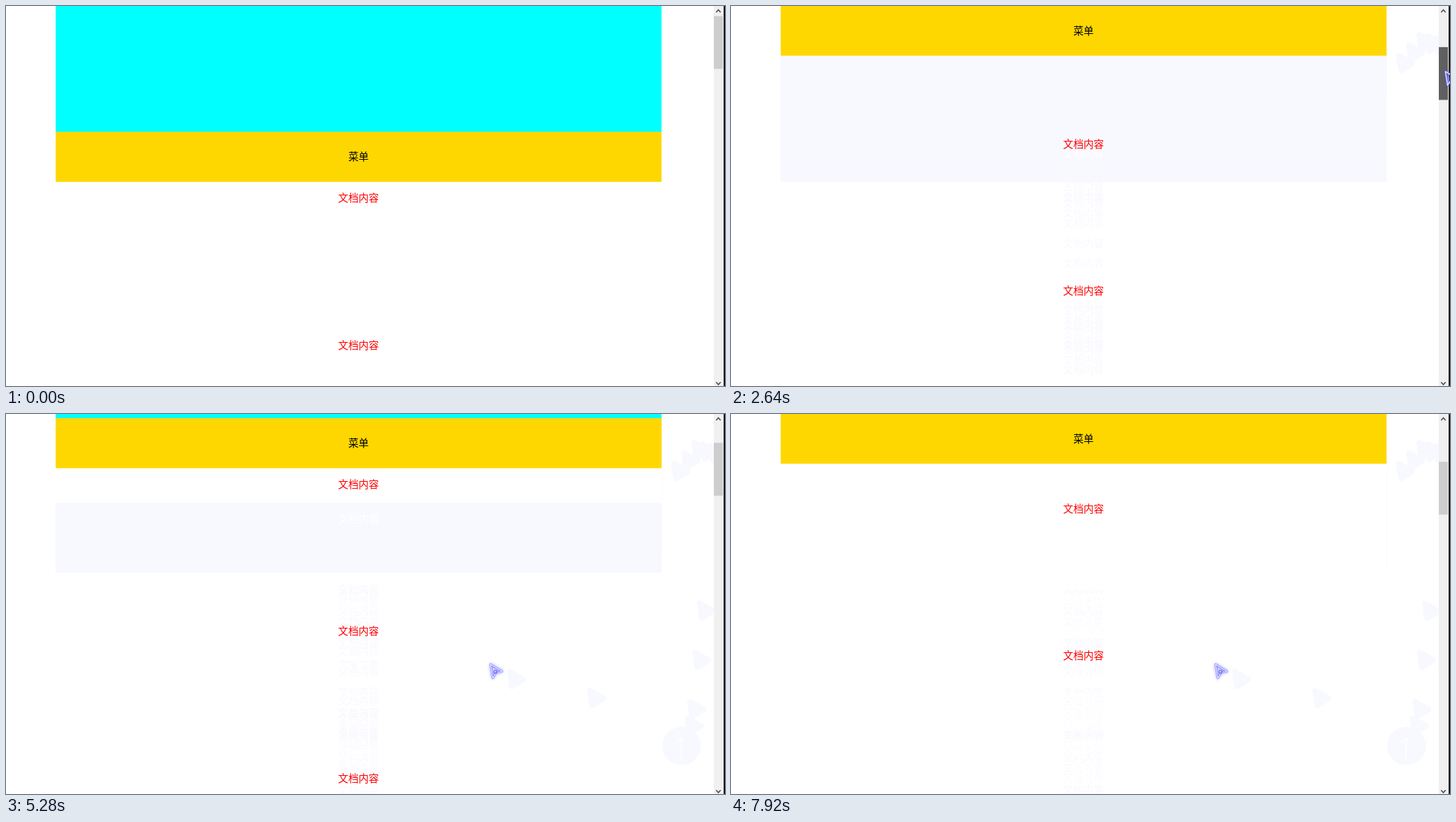
Animation, 1029 px wide and 544 px high, one loop 8000 ms. Source, as an HTML page with a canvas:

```html
<!DOCTYPE html>
<html lang="zh-CN">
<head>
<meta charset="utf-8">
<title>菜单</title>
<style>
html, body { margin: 0; width: 100%; height: 100%; overflow: hidden; background: #fff; }
canvas { display: block; }
</style>
</head>
<body>
<canvas id="stage" width="1029" height="544"></canvas>
<script>
const W = 1029, H = 544, TICK = 120, LOOP = 8000;
const LEFT = 71.1, WIDTH = 867.1, MIDDLE = 504.5;
const BANNER = 180, MENU_BOTTOM = 251.8, PINNED_BOTTOM = 71.2;
const ROW = 210.3, FIRST_ROW = 276;
const THUMB_RATIO = 0.154, BUTTON_FROM = 360;
const TRACE = '#f8f8ff';

const screen = document.getElementById('stage').getContext('2d');
const traces = Object.assign(document.createElement('canvas'), { width: W, height: H }).getContext('2d');

const linear = p => p;
const swing = p => 0.5 - 0.5 * Math.cos(Math.PI * p);
const within = (time, from, to) => time >= from && time < to;

// Keys are [time, ...values]; values are held before the first and after the last key.
function interpolate(keys, time, ease = linear) {
  const next = keys.findIndex(key => key[0] > time);
  if (next === 0) return keys[0].slice(1);
  if (next < 0) return keys[keys.length - 1].slice(1);
  const [from, to] = [keys[next - 1], keys[next]];
  const p = ease((time - from[0]) / (to[0] - from[0]));
  return from.slice(1).map((value, i) => value + (to[i + 1] - value) * p);
}

const dragDown = [[960, 0], [1680, 175], [2640, 288], [2880, 384]];
const backToTop = [[3775, 384], [4275, 0]];
const wheel = [
  [4860, 0], [5400, 224], [5880, 283], [6120, 283], [6360, 191], [6660, 0],
  [6900, 0], [7200, 81], [7680, 267], [7920, 350]
];
const pointerPath = [
  [360, 956, 71], [600, 985, 41], [960, 1021, 48], [2880, 1021, 107],
  [3000, 993, 271], [3240, 979, 412], [3480, 972, 459], [4200, 972, 459],
  [4320, 836, 396], [4440, 721, 369], [4560, 692, 357]
];

function scrollAt(time) {
  if (time < 3600) return interpolate(dragDown, time)[0];
  if (time < 4800) return interpolate(backToTop, time, swing)[0];
  return interpolate(wheel, time)[0];
}

function stateAt(time) {
  const scroll = scrollAt(time);
  const dragging = within(time, 960, 3000);
  const clean = within(time, 2640, 2880) || within(time, 4920, 5040) ||
    within(time, 5280, 6300) || time >= 6480;
  return {
    scroll, dragging,
    pointer: time < 360 ? null
      : dragging ? [1021, 48 + scroll * THUMB_RATIO]
      : interpolate(pointerPath, time),
    button: scroll > BUTTON_FROM,
    tone: clean ? '#fff' : TRACE
  };
}

function polyline(ctx, points, close) {
  ctx.beginPath();
  points.forEach(([x, y]) => ctx.lineTo(x, y));
  if (close) ctx.closePath();
}

function label(ctx, text, y, color) {
  ctx.font = '14.6px "Noto Sans CJK SC", "Noto Sans CJK", sans-serif';
  ctx.textAlign = 'center';
  ctx.fillStyle = color;
  ctx.fillText(text, MIDDLE, Math.round(y + 4.4));
}

function rows(ctx, scroll, color) {
  for (let n = 0; n < 5; n++) label(ctx, '文档内容', FIRST_ROW + n * ROW - scroll, color);
}

function header(ctx, scroll, bannerColor, menuColor) {
  const top = Math.round(Math.max(0, BANNER - scroll));
  const bottom = Math.max(PINNED_BOTTOM, MENU_BOTTOM - scroll);
  ctx.fillStyle = bannerColor;
  ctx.fillRect(LEFT, 0, WIDTH, top);
  ctx.fillStyle = menuColor;
  ctx.fillRect(LEFT, top, WIDTH, bottom - top);
  return top;
}

function topButton(ctx, color) {
  ctx.fillStyle = color;
  ctx.beginPath();
  ctx.arc(966.8, 475.3, 27.5, 0, 7);
  ctx.fill();
  ctx.strokeStyle = '#fff';
  ctx.lineWidth = 1.6;
  polyline(ctx, [[966.5, 495], [966.5, 464]]);
  ctx.stroke();
  polyline(ctx, [[960.5, 470], [966.5, 464], [972.5, 470]]);
  ctx.stroke();
}

function pointerTrace(ctx, [x, y], color) {
  polyline(ctx, [[x, y], [x + 19, y + 11], [x + 3, y + 21]], true);
  ctx.fillStyle = ctx.strokeStyle = color;
  ctx.lineJoin = 'round';
  ctx.lineWidth = 8;
  ctx.fill();
  ctx.stroke();
}

function drawPointer(ctx, [x, y]) {
  ctx.save();
  ctx.translate(x, y);
  ctx.lineJoin = 'round';
  polyline(ctx, [[1.5, 1.5], [18, 11.5], [9.5, 13.5], [4.5, 21]], true);
  ctx.shadowColor = 'rgba(80, 80, 255, 0.7)';
  ctx.shadowBlur = 4;
  ctx.strokeStyle = 'rgba(110, 110, 250, 0.75)';
  ctx.lineWidth = 2.8;
  ctx.stroke();
  ctx.shadowBlur = 0;
  ctx.strokeStyle = '#fff';
  ctx.lineWidth = 1.2;
  ctx.stroke();
  ctx.fillStyle = 'rgba(90, 90, 255, 0.15)';
  ctx.fill();
  ctx.strokeStyle = 'rgba(90, 90, 240, 0.8)';
  ctx.beginPath();
  ctx.arc(8.5, 12, 2.2, 0, 7);
  ctx.stroke();
  ctx.restore();
}

function scrollbar(ctx, { scroll, dragging }) {
  ctx.fillStyle = '#f0f0f0';
  ctx.fillRect(1013, 0, 13.5, H);
  ctx.fillStyle = dragging ? '#606060' : '#cdcdcd';
  ctx.fillRect(1013, 14.5 + scroll * THUMB_RATIO, 13, 75.6);
  ctx.fillStyle = '#1c1c1c';
  ctx.fillRect(1027, 0, 2, H);
  ctx.strokeStyle = '#505050';
  ctx.lineWidth = 1.7;
  ctx.lineJoin = 'miter';
  for (const [y, dir] of [[7, 1], [540.5, -1]]) {
    polyline(ctx, [[1016.3, y + 2 * dir], [1019.5, y - 1.5 * dir], [1022.7, y + 2 * dir]]);
    ctx.stroke();
  }
}

// Everything that moved since the previous tick is wiped with the current tone.
function wipe(prev, next) {
  const { tone } = next;
  if (prev.scroll !== next.scroll) {
    rows(traces, prev.scroll, tone);
    header(traces, prev.scroll, tone, tone);
  }
  if (prev.button && !next.button) topButton(traces, tone);
  if (prev.pointer && String(prev.pointer) !== String(next.pointer)) pointerTrace(traces, prev.pointer, tone);
}

function render(state) {
  screen.drawImage(traces.canvas, 0, 0);
  rows(screen, state.scroll, '#f00');
  const top = header(screen, state.scroll, '#0ff', '#ffd700');
  label(screen, '菜单', top + 36.4, '#000');
  if (state.button) topButton(screen, '#000');
  scrollbar(screen, state);
  if (state.pointer) drawPointer(screen, state.pointer);
}

let shown = -1;
function play() {
  const tick = Math.floor(performance.now() % LOOP / TICK);
  if (tick !== shown) {
    if (shown < 0 || tick < shown) {
      traces.fillStyle = '#fff';
      traces.fillRect(0, 0, W, H);
      shown = 0;
    }
    for (; shown < tick; shown++) wipe(stateAt(shown * TICK), stateAt((shown + 1) * TICK));
    render(stateAt(tick * TICK));
  }
  requestAnimationFrame(play);
}
play();
</script>
</body>
</html>
```
